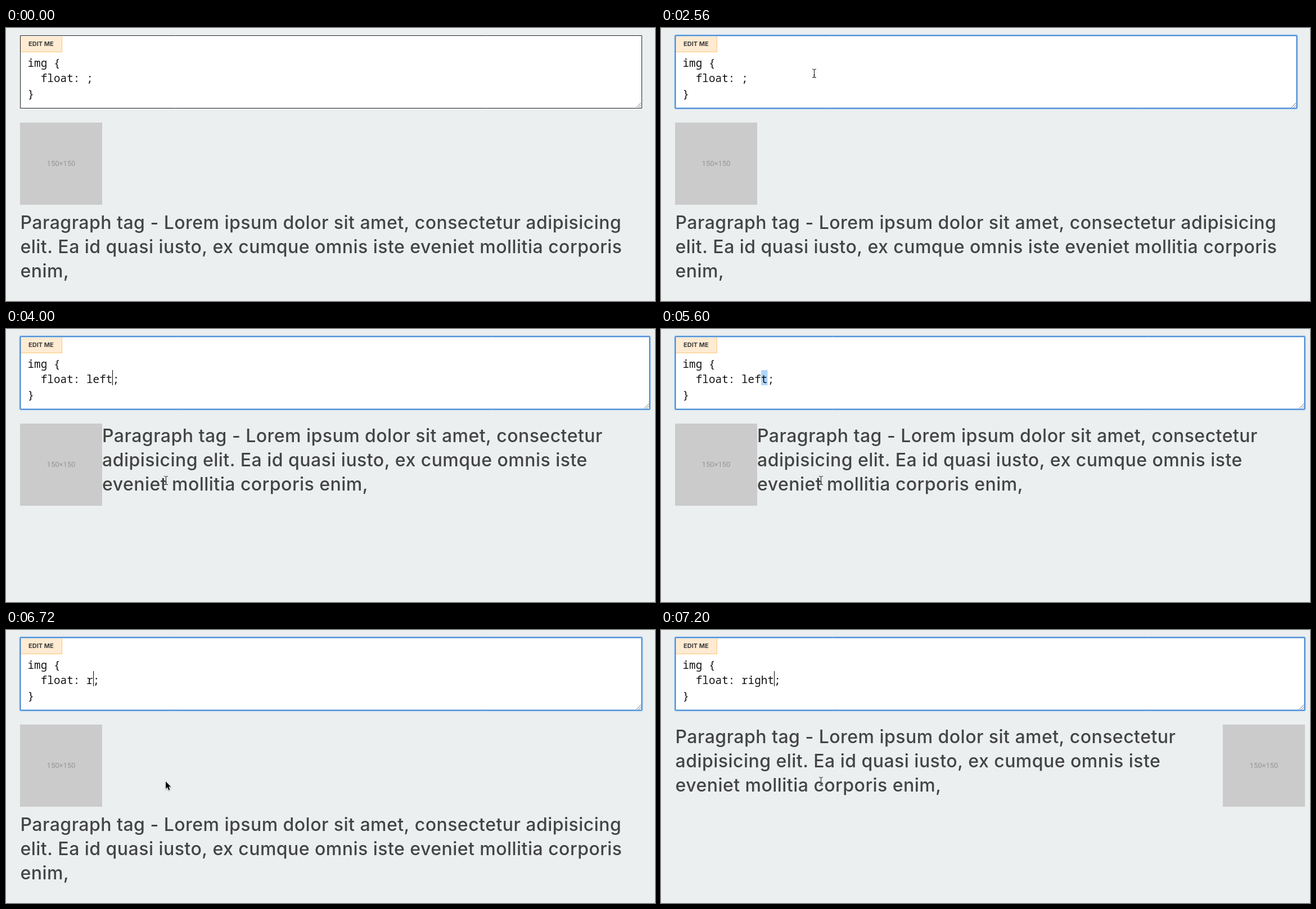
These frames come from a looping animation (1154x485 px, 8000 ms). An HTML page with a canvas:

```html
<!DOCTYPE html>
<html lang="en">
<head>
<meta charset="utf-8">
<title>CSS float demo</title>
<style>
  html, body { margin: 0; width: 100%; height: 100%; overflow: hidden; background: #ebeff0; }
  canvas { display: block; }
</style>
</head>
<body>
<canvas id="stage" width="1154" height="485"></canvas>
<script>
const ctx = document.getElementById('stage').getContext('2d');
const LOOP = 8000, STEP = 160;
const CODE = { font: '19.2px "Noto Sans Mono", monospace', color: '#111', spacing: 0.1 };
const BODY = { font: '500 32px Inter, sans-serif', color: '#444', spacing: 0.47 };
const TAB = { font: '700 11px Inter, sans-serif', color: '#3c3c3c', spacing: 0 };
const LABEL = { font: '13px Roboto, sans-serif', color: '#969696', spacing: 0 };
const CHAR = 11.62, CODE_X = 38.5, VALUE_X = CODE_X + 9 * CHAR;

const wide = [
  'Paragraph tag - Lorem ipsum dolor sit amet, consectetur adipisicing',
  'elit. Ea id quasi iusto, ex cumque omnis iste eveniet mollitia corporis',
  'enim,'
];
const narrow = [
  'Paragraph tag - Lorem ipsum dolor sit amet, consectetur',
  'adipisicing elit. Ea id quasi iusto, ex cumque omnis iste',
  'eveniet mollitia corporis enim,'
];

// [time, x, y] of the pointer
const pointer = [
  [480, 494, 7], [640, 375, 69], [960, 280, 69], [1120, 170, 69],
  [1440, 160, 79], [1600, 150, 92], [1760, 147, 96], [2080, 152, 95],
  [2240, 182, 91], [2400, 244, 84], [2560, 272, 80.5], [2720, 277, 132],
  [2880, 283, 226], [3040, 284, 269]
];
const typed = [
  [0, ''], [3680, 'l'], [3840, 'le'], [4000, 'left'],
  [6720, 'r'], [6880, 'ri'], [7040, 'righ'], [7200, 'right']
];
// [time, visible]
const caretShown = [
  [1920, true], [2400, false], [2880, true], [3360, false],
  [3680, true], [5600, false], [6720, true]
];

const latest = (keys, t) => keys.filter(k => k[0] <= t).pop();

function text(str, x, y, style) {
  ctx.font = style.font;
  ctx.fillStyle = style.color;
  ctx.letterSpacing = style.spacing + 'px';
  ctx.fillText(str, x, y);
}

function rect(x, y, w, h, color) {
  ctx.fillStyle = color;
  ctx.fillRect(x, y, w, h);
}

function frame(x, y, w, h, grow, color, radius = 0) {
  ctx.strokeStyle = color;
  ctx.lineWidth = 1;
  ctx.beginPath();
  ctx.roundRect(x + 0.5 - grow, y + 0.5 - grow, w - 1 + 2 * grow, h - 1 + 2 * grow, radius);
  ctx.stroke();
}

function editor(right, focused, value, selected, caret) {
  const x = 25, y = 13, w = right - x, h = 130;
  rect(x, y, w, h, '#fff');

  rect(26, 15, 74, 28, '#ffebd2');
  rect(99, 15, 1, 28, '#fbc777');
  rect(26, 42, 74, 1, '#fbc777');
  text('EDIT ME', 40, 32, TAB);

  if (focused) {
    frame(x, y, w, h, 2, 'rgba(90,160,235,.25)', 3);
    frame(x, y, w, h, 1, 'rgba(80,150,230,.65)', 2);
    frame(x, y, w, h, 0, '#2f76c6');
    frame(x, y, w, h, -1, 'rgba(80,150,230,.45)');
  } else {
    frame(x, y, w, h, 0, '#222');
  }

  ctx.strokeStyle = '#777';
  ctx.beginPath();
  for (const n of [8, 4]) {
    ctx.moveTo(right - 2 - n, y + h - 2);
    ctx.lineTo(right - 2, y + h - 2 - n);
  }
  ctx.stroke();

  if (selected) {
    const w = selected * CHAR;
    rect(VALUE_X + value.length * CHAR - w, 73, w, 27, '#b0d6fd');
  }
  text('img {', CODE_X, 69, CODE);
  text('  float: ' + value + ';', CODE_X, 96, CODE);
  text('}', CODE_X, 123.5, CODE);
  if (caret) rect(Math.round(VALUE_X + value.length * CHAR - 0.2), 73, 1, 27, '#000');
}

function placeholder(x) {
  rect(x, 168, 146, 146, '#cbcbcb');
  ctx.textAlign = 'center';
  text('150×150', x + 73, 245, LABEL);
  ctx.textAlign = 'left';
}

function paragraph(lines, x, y) {
  lines.forEach((line, i) => text(line, x, y + 43 * i, BODY));
}

function beam(x, y) {
  ctx.beginPath();
  for (const s of [-1, 1]) {
    ctx.moveTo(x - 3.5, y + 7.5 * s);
    ctx.quadraticCurveTo(x, y + 7.5 * s, x, y + 5.5 * s);
    ctx.quadraticCurveTo(x, y + 7.5 * s, x + 3.5, y + 7.5 * s);
  }
  ctx.moveTo(x, y - 6);
  ctx.lineTo(x, y + 6);
  ctx.moveTo(x - 1.5, y + 3);
  ctx.lineTo(x + 1.5, y + 3);
  ctx.strokeStyle = 'rgba(255,255,255,.6)';
  ctx.lineWidth = 2.5;
  ctx.stroke();
  ctx.strokeStyle = '#222';
  ctx.lineWidth = 1.1;
  ctx.stroke();
}

function arrow(x, y) {
  const points = [[0, 0], [0, 13], [3, 10.2], [5.2, 15.4], [7.4, 14.4], [5.2, 9.4], [9.3, 9.4]];
  ctx.save();
  ctx.translate(x, y);
  ctx.beginPath();
  points.forEach(p => ctx.lineTo(...p));
  ctx.closePath();
  ctx.shadowColor = 'rgba(0,0,0,.35)';
  ctx.shadowBlur = 2;
  ctx.shadowOffsetY = 1;
  ctx.strokeStyle = '#fff';
  ctx.lineWidth = 1.8;
  ctx.stroke();
  ctx.shadowColor = 'transparent';
  ctx.fillStyle = '#000';
  ctx.fill();
  ctx.restore();
}

function draw(t) {
  const value = latest(typed, t)[1];
  const floated = value === 'left' || value === 'right';
  const right = floated ? 1145 : 1131;
  const selected = t >= 5600 && t < 6720 ? Math.min(4, 1 + (t - 5600) / STEP) : 0;
  const caret = latest(caretShown, t);

  rect(0, 0, 1154, 485, '#ebeff0');
  editor(right, t >= 1920, value, selected, caret && caret[1]);
  placeholder(value === 'right' ? right - 146 : 25);
  if (floated) paragraph(narrow, value === 'left' ? 171 : 25.5, 201);
  else paragraph(wide, 25.5, 357);

  const pos = latest(pointer, t);
  if (!pos) return;
  const [, x, y] = pos;
  const overText = (y > 14 && y < 143) || floated;
  if (overText) beam(x + 0.5, y);
  else arrow(x, y);
}

function tick(now) {
  const t = now % LOOP;
  draw(t - t % STEP);
  requestAnimationFrame(tick);
}
requestAnimationFrame(tick);
</script>
</body>
</html>
```
